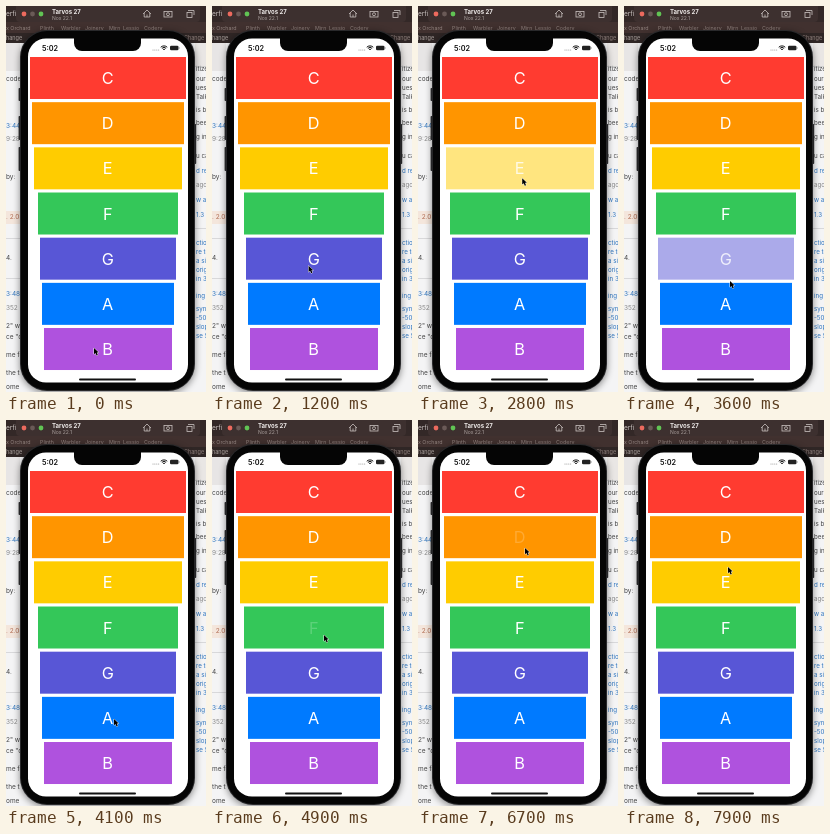
An HTML page with a canvas for the animation above (8 s loop, 200 by 386 pixels).

```html
<!DOCTYPE html>
<html lang="en">
<head>
<meta charset="utf-8">
<title>Keys</title>
<style>
html, body { margin: 0; width: 100%; height: 100%; overflow: hidden; background: #f3f3f3; }
canvas { display: block; width: 200px; height: 386px; }
</style>
</head>
<body>
<canvas id="stage"></canvas>
<script>
const W = 200, H = 386, LOOP = 8000, STEP = 100;
const cv = document.getElementById('stage');
const dpr = window.devicePixelRatio || 1;
cv.width = W * dpr;
cv.height = H * dpr;
const g = cv.getContext('2d');

// letter, colour, left inset
const KEYS = [
  ['C', '#ff3b30', 24], ['D', '#ff9500', 26], ['E', '#ffcc00', 28], ['F', '#34c759', 32],
  ['G', '#5856d6', 34], ['A', '#007aff', 36], ['B', '#af52de', 38]
];
// key index, release time
const TAPS = [[6, 600], [3, 1900], [2, 2600], [4, 3400], [5, 4300], [3, 5000], [6, 5600], [1, 6800]];
// time, x, y of the pointer tip
const PATH = [
  [0, 88, 342], [700, 89, 342], [1600, 102, 201], [1900, 102, 200], [2400, 104, 161], [2700, 104, 161],
  [3200, 106, 270], [3600, 106, 275], [4100, 108, 299], [4400, 108, 299], [4800, 112, 215],
  [5000, 112, 215], [5400, 126, 336], [5700, 126, 336], [6500, 107, 128], [6900, 107, 128],
  [7500, 104, 113], [7900, 104, 147]
];

function rect(x, y, w, h, c) {
  g.fillStyle = c;
  g.fillRect(x, y, w, h);
}
function round(x, y, w, h, r, c) {
  g.fillStyle = c;
  g.beginPath();
  g.roundRect(x, y, w, h, r);
  g.fill();
}
function dot(x, y, r, c) {
  g.fillStyle = c;
  g.beginPath();
  g.arc(x, y, r, 0, Math.PI * 2);
  g.fill();
}
function text(s, x, y, size, c, weight = 400, align = 'left') {
  g.font = `${weight} ${size}px Inter, "Liberation Sans", sans-serif`;
  g.textAlign = align;
  g.textBaseline = 'alphabetic';
  g.fillStyle = c;
  g.fillText(s, x, y);
}
function line(points, c, w) {
  g.strokeStyle = c;
  g.lineWidth = w;
  g.beginPath();
  points.forEach(([x, y], i) => i ? g.lineTo(x, y) : g.moveTo(x, y));
  g.stroke();
}

function desktop() {
  rect(0, 0, W, H, '#f4f4f5');
  rect(0, 0, W, 37, '#332827');
  rect(0, 16, W, 11, '#41312f');
  rect(0, 27, W, 10, '#2f2625');
  text('erfic', 0, 10, 6.5, '#c9c1bf');
  const marks = [['Fox Orchard', -6], ['Plinth', 34], ['Warbler', 55], ['Joinery', 79],
    ['Mirn', 103], ['Lessio', 117], ['Codery', 138]];
  for (const [s, x] of marks) text(s, x, 23.5, 5.3, '#91827e');
  text('hange', 0, 34, 5.5, '#aaa09d');
  text('Change', 178, 34, 5.5, '#91827e');

  rect(0, 37, 14, 28, '#e7e5e5');
  rect(0, 205, 14, 13, '#f4e6dc');
  rect(0, 232, 14, 1, '#d8d8da');
  rect(189, 37, 11, 23, '#e9e6e4');
  rect(189, 60, 11, 1, '#cfcfcf');
  rect(189, 222, 11, 1, '#d8d8da');
  rect(0, 272, 14, 1, '#d8d8da');

  const ink = '#444', link = '#2f75bd', dim = '#888';
  const left = [['code', 75, ink], ['by:', 173, ink], ['3:44', 122, link], ['9:28', 135, dim],
    ['. 2.0', 213, '#b06a50'], ['4.', 254, ink], ['3:48', 290, link], ['352', 304, dim],
    ['2" with', 322, ink], ['ce "do', 333, ink], ['me fo', 351, ink], ['the ta', 369, ink], ['ome ta', 383, ink]];
  const right = [['itize', 65, ink], ['our q', 75, ink], ['uesti', 84, ink], ['TalkB', 93, ink],
    ['is ba', 106, ink], ['been', 119, ink], ['g in a', 133, ink], ['u can', 152, ink],
    ['d rela', 167, link], ['ago', 181, dim], ['w after', 196, link], ['1.3 re', 211, link],
    ['ction', 239, link], ['re to', 248, link], ['a sim', 257, link], ['orig', 266, link],
    ['in 3 m', 275, link], ['ing', 292, link], ['sync', 305, link], ['-50 c', 314, link],
    ['slope', 323, link], ['se St', 332, link]];
  g.save();
  g.beginPath();
  g.rect(0, 37, 14, H);
  g.rect(189, 37, 11, H);
  g.clip();
  for (const [s, y, c] of left) text(s, 0, y, 6.5, c);
  for (const [s, y, c] of right) text(s, 190, y, 6.2, c);
  g.restore();
}

function toolbar() {
  round(10, -8, 184, 24, 4, '#3d302f');
  dot(18, 8, 2.4, '#ed6a5e');
  dot(26.5, 8, 2.4, '#6a5a57');
  dot(35, 8, 2.4, '#61c454');
  text('Tarvos 27', 46, 8, 6, '#f0eceb', 700);
  text('Nox 22.1', 46, 14, 5, '#aaa09e');

  const c = '#c8c0be';
  line([[137, 8], [141, 4], [145, 8]], c, .8);
  line([[138.2, 7], [138.2, 11], [143.8, 11], [143.8, 7]], c, .8);
  line([[141, 11], [141, 8.5]], c, .8);
  g.strokeRect(158, 5.5, 8, 5.5);
  g.beginPath();
  g.arc(162, 8.2, 1.5, 0, 7);
  g.stroke();
  g.strokeRect(181, 6.5, 5, 5);
  line([[182, 4.5], [188, 4.5], [188, 9]], c, .8);
}

function phone() {
  g.save();
  g.shadowColor = 'rgba(0,0,0,.45)';
  g.shadowBlur = 7 * dpr;
  g.shadowOffsetY = 2 * dpr;
  round(14, 24, 175, 361, 27, '#29292b');
  g.restore();
  for (const [y, h] of [[82, 13], [110, 24], [141, 24]]) round(12.6, y, 2, h, .8, '#252527');
  round(188.4, 118, 1.8, 40, .8, '#252527');
  round(15, 25, 173, 359, 26, '#050505');
  round(22, 32.5, 160, 344, 18, '#fff');

  round(68, 29, 67, 16, [0, 0, 8, 8], '#050505');
  text('5:02', 36, 45, 7.3, '#111', 600);
  for (let i = 0; i < 4; i++) dot(147 + i * 1.9, 44, .5, '#888');
  g.strokeStyle = '#111';
  g.lineWidth = 1;
  for (const r of [1.3, 3, 4.6]) {
    g.beginPath();
    g.arc(158, 44.5, r, -Math.PI * .75, -Math.PI * .25);
    g.stroke();
  }
  round(164, 39.7, 8.5, 4.6, 1.3, '#222');
  rect(172.8, 41.2, .7, 1.6, '#888');
  round(73, 372.6, 57, 2, 1, '#111');
}

function keyState(i, t) {
  let fill = 1, label = 1;
  for (const [k, up] of TAPS) {
    if (k !== i) continue;
    const d = t - up;
    if (d >= -100 && d < 0) label = .2;
    if (d >= 0 && d < 250) {
      fill = .5;
      label = Math.min(1, .2 + d / 250);
    }
  }
  return { fill, label };
}

function keys(t) {
  KEYS.forEach(([name, color, x], i) => {
    const y = 51 + i * 45.17;
    const s = keyState(i, t);
    g.globalAlpha = s.fill;
    rect(x, y, 204 - 2 * x, 42, color);
    g.globalAlpha = s.label * (s.fill < 1 ? .8 : 1);
    text(name, 101.7, y + 27, 16.3, '#fff', 400, 'center');
    g.globalAlpha = 1;
  });
}

function pointerAt(t) {
  const n = PATH.findIndex(p => p[0] > t);
  if (n < 0) return PATH[PATH.length - 1].slice(1);
  const [t0, x0, y0] = PATH[n - 1], [t1, x1, y1] = PATH[n];
  const u = (t - t0) / (t1 - t0), e = u * u * (3 - 2 * u);
  return [x0 + (x1 - x0) * e, y0 + (y1 - y0) * e];
}

function pointer(t) {
  const [x, y] = pointerAt(t);
  g.save();
  g.translate(x, y);
  g.beginPath();
  [[0, 0], [0, 6.2], [1.5, 4.9], [2.6, 7.4], [3.8, 6.9], [2.8, 4.5], [4.7, 4.4]]
    .forEach(([a, b]) => g.lineTo(a, b));
  g.closePath();
  g.lineJoin = 'round';
  g.lineWidth = 1;
  g.strokeStyle = 'rgba(255,255,255,.85)';
  g.stroke();
  g.fillStyle = '#000';
  g.fill();
  g.restore();
}

function draw(now) {
  const t = Math.floor((now % LOOP) / STEP) * STEP;
  g.setTransform(dpr, 0, 0, dpr, 0, 0);
  desktop();
  toolbar();
  phone();
  keys(t);
  pointer(t < 400 ? 0 : t);
}

const start = performance.now();
function loop() {
  draw(performance.now() - start);
  requestAnimationFrame(loop);
}
loop();
</script>
</body>
</html>
```
